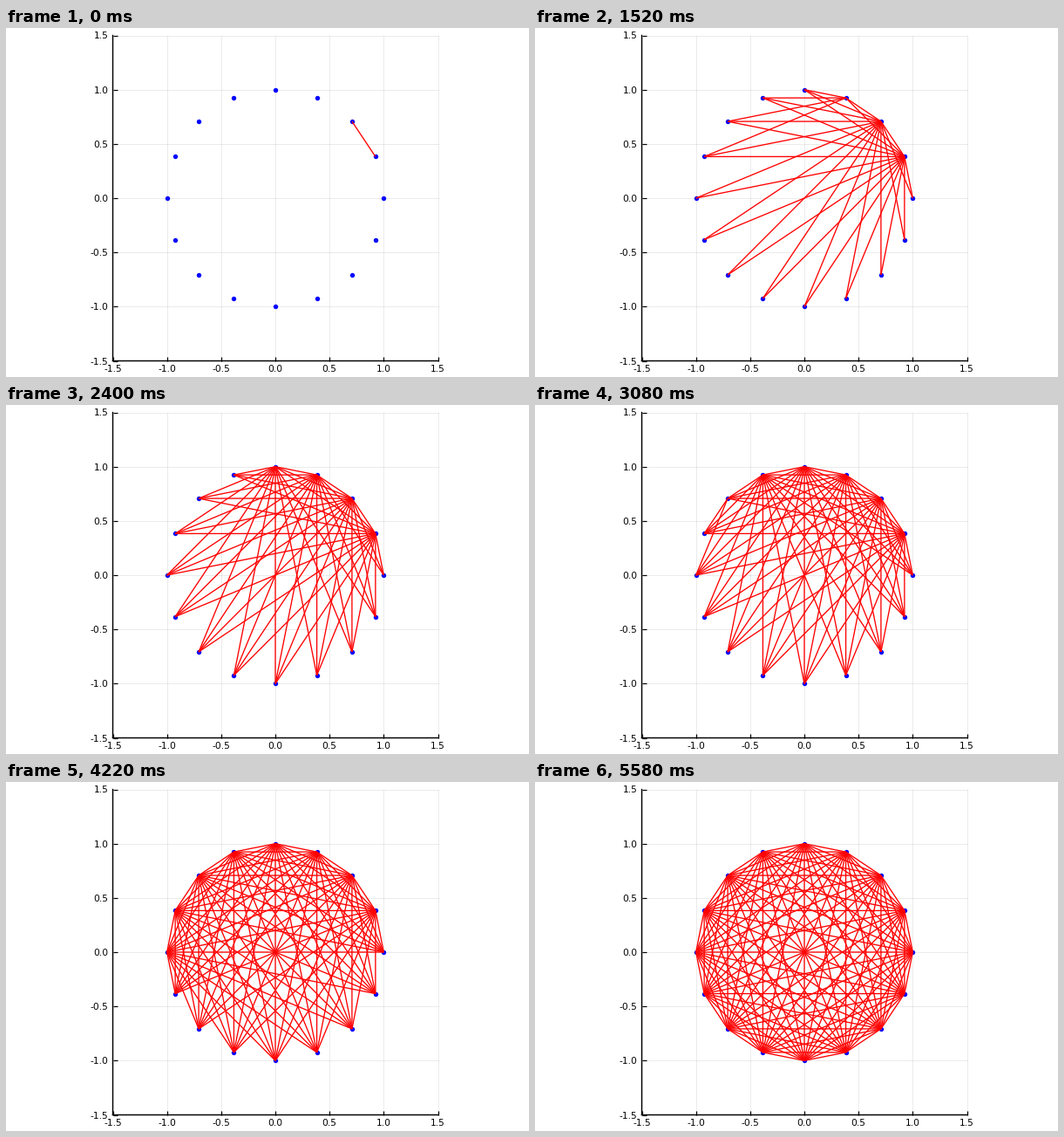
A matplotlib script that plays this animation: 600 px wide and 400 px high, repeating every 5680 ms.

```python
from itertools import combinations

import matplotlib.pyplot as plt
import numpy as np
from matplotlib.animation import FuncAnimation
from matplotlib.collections import LineCollection

W, H, DPI = 600, 400, 100
PX = 72 / DPI                      # one pixel in points
LEFT, TOP, SIDE = 122.5, 8.5, 373  # plot square, in pixels
STEP, LOOP = 20, 5680              # ms
N = 16

plt.rcParams["font.family"] = "DejaVu Sans"

angles = 2 * np.pi * np.arange(1, N + 1) / N
points = np.column_stack([np.cos(angles), np.sin(angles)])
edges = [points[list(pair)] for pair in combinations(range(N), 2)]

fig = plt.figure(figsize=(W / DPI, H / DPI), dpi=DPI, facecolor="white")
ax = fig.add_axes([LEFT / W, 1 - (TOP + SIDE) / H, SIDE / W, SIDE / H])
ax.set(xlim=(-1.5, 1.5), ylim=(-1.5, 1.5))

ticks = np.linspace(-1.5, 1.5, 7)
labels = [f"{t:.1f}" for t in ticks]
ax.set_xticks(ticks, labels)
ax.set_yticks(ticks, labels)
ax.tick_params(direction="in", length=5 * PX, width=1.2 * PX, pad=5 * PX,
               labelsize=10.67 * PX)
ax.set_axisbelow(True)
ax.grid(color="black", alpha=0.08, linewidth=PX, clip_on=False)

ax.spines[["top", "right"]].set_visible(False)
for side in ("left", "bottom"):
    ax.spines[side].set(linewidth=1.4 * PX, snap=False)

ax.scatter(*points.T, s=(5.4 * PX) ** 2, color="blue", linewidths=0, zorder=3)
chords = LineCollection([], colors="red", linewidths=1.33 * PX, zorder=4)
chords.set_snap(False)
ax.add_collection(chords, autolim=False)


def edge_count(tick):
    """Three edges per seven ticks: the second one is held for five."""
    group, rest = divmod(tick, 7)
    return min(3 * group + 1 + (rest >= 1) + (rest == 6), len(edges))


def update(tick):
    chords.set_segments(edges[:edge_count(tick)])
    return (chords,)


anim = FuncAnimation(fig, update, frames=LOOP // STEP, interval=STEP,
                     init_func=lambda: update(0), repeat=True, repeat_delay=0)
plt.show()
```
